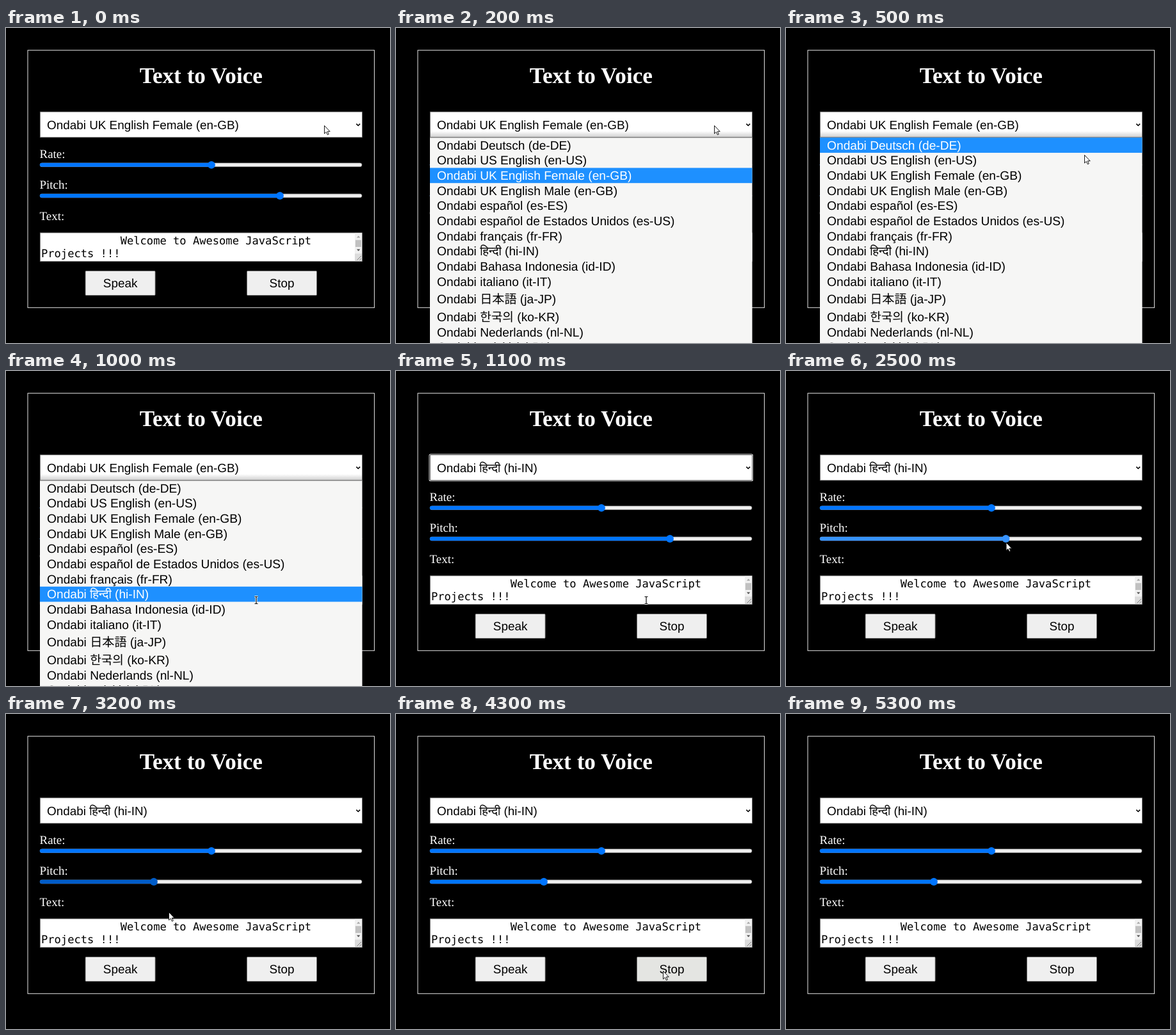
An HTML page for the animation above (8000 ms loop, 600x492 px).

```html
<!DOCTYPE html>
<html lang="en">
<head>
<meta charset="utf-8">
<title>Text to Voice</title>
<style>
html, body { margin: 0; width: 100%; height: 100%; overflow: hidden; background: #000; }
svg { display: block; width: 600px; height: 492px; }
text { text-rendering: geometricPrecision; }
.serif { font: 18.9px "Liberation Serif", serif; fill: #fff; }
.title { font-size: 35.2px; font-weight: bold; text-anchor: middle; }
.sans { font: 18.87px "Liberation Sans", "Noto Sans", "Noto Sans CJK JP", sans-serif; }
.mono { font: 17.1px "DejaVu Sans Mono", monospace; }
.mid { text-anchor: middle; }
.box { fill: #fff; stroke: #767676; stroke-width: .8; }
.button { fill: #efefef; }
.button.hover { fill: #e4e5e2; }
.option text { font-size: 19.15px; }
.option rect { fill: none; }
.option.active rect { fill: #1e90ff; }
.option.active text { fill: #fff; }
.slider .track { fill: #efefef; stroke: #b2b2b2; stroke-width: .7; }
.slider { fill: #0075ff; }
.slider.hover { fill: #005cc8; }
.slider.drag { fill: #3793ff; }
</style>
</head>
<body>
<svg viewBox="0 0 600 492">
  <defs>
    <linearGradient id="shade" x2="0" y2="1">
      <stop stop-opacity="0"/><stop offset="1" stop-opacity=".2"/>
    </linearGradient>
    <path id="beamShape" d="M-2.5-5.5H-1Q0-5.5 0-4.5V4.5Q0 5.5-1 5.5H-2.5M2.5-5.5H1Q0-5.5 0-4.5M0 4.5Q0 5.5 1 5.5H2.5"/>
  </defs>
  <rect width="600" height="492"/>
  <rect x="34" y="34.8" width="541.6" height="402" fill="none" stroke="#fff" stroke-width=".9"/>
  <text class="serif title" x="304.8" y="85.6">Text to Voice</text>

  <g id="ring">
    <rect x="51.5" y="129.5" width="506.5" height="42.8" rx="2.5" fill="#fff"/>
    <rect x="52.3" y="130.3" width="504.9" height="41.2" rx="2" fill="#101010"/>
  </g>
  <rect class="box" x="53.3" y="131" width="503.2" height="39.8"/>
  <text id="voice" class="sans" x="64.1" y="157.5"></text>
  <path d="M547.4 149.6l2.9 2.9 2.9-2.9" fill="none" stroke="#000" stroke-width="1.5"/>

  <text class="serif" x="52.6" y="203">Rate:</text>
  <text class="serif" x="52.6" y="251">Pitch:</text>
  <text class="serif" x="52.6" y="299.5">Text:</text>
  <g id="sliders"></g>

  <rect class="box" x="53.3" y="319.9" width="503.2" height="44.6"/>
  <text class="mono" x="178.7" y="337.8">Welcome to Awesome JavaScript</text>
  <text class="mono" x="55" y="358.3">Projects !!!</text>
  <path d="M545 320.3h11.1v32H545z" fill="#f1f1f1"/>
  <path d="M546 331.2h9v10.8h-9z" fill="#c1c1c1"/>
  <path d="M548 327.6l2.7-3 2.7 3z" fill="#a3a3a3"/>
  <path d="M548 345.6l2.7 3 2.7-3z" fill="#505050"/>
  <path d="M545 352.3h11.1v11.8H545z" fill="#dcdcdc"/>
  <path d="M548.5 362.5l6.5-6.5M552.5 362.5l2.5-2.5" stroke="#777" stroke-width=".9"/>

  <rect id="speakButton" class="box button" x="124.1" y="379.5" width="109" height="38" rx="1.2"/>
  <text class="sans mid" x="178.6" y="405">Speak</text>
  <rect id="stopButton" class="box button" x="376.5" y="379.5" width="109" height="38" rx="1.2"/>
  <text class="sans mid" x="431" y="405">Stop</text>

  <g id="popup">
    <rect x="53.6" y="161" width="502.8" height="10" fill="url(#shade)"/>
    <rect x="53" y="170.8" width="503.6" height="330" fill="#f6f6f5"/>
    <path d="M53 171.1h503.6" stroke="#666" stroke-width=".8"/>
    <g id="options"></g>
  </g>

  <g id="cursor">
    <path id="arrow" d="M.5.5V13L3.3 10.4 5.4 14.8 7.3 13.9 5.3 9.7H9.2z" fill="#fff" stroke="#000" stroke-width=".9" stroke-linejoin="round"/>
    <g id="beam" fill="none">
      <use href="#beamShape" stroke="#fff" stroke-width="3"/>
      <use href="#beamShape" stroke="#111" stroke-width="1.2"/>
    </g>
  </g>
</svg>
<script>
const LOOP = 8000, STEP = 100;
const $ = id => document.getElementById(id);
const show = (id, on) => $(id).setAttribute('visibility', on ? 'visible' : 'hidden');

const voices = [
  'Deutsch (de-DE)', 'US English (en-US)', 'UK English Female (en-GB)',
  'UK English Male (en-GB)', 'español (es-ES)', 'español de Estados Unidos (es-US)',
  'français (fr-FR)', 'हिन्दी (hi-IN)', 'Bahasa Indonesia (id-ID)', 'italiano (it-IT)',
  '日本語 (ja-JP)', '한국의 (ko-KR)', 'Nederlands (nl-NL)', 'polski (pl-PL)'
].map(label => 'Ondabi ' + label);

// Rows with East Asian glyphs are taller and sit lower.
let rowTop = 171.2;
$('options').innerHTML = voices.map(label => {
  const extra = /ja-JP|ko-KR/.test(label) ? 4 : 0;
  const row = `<g class="option"><rect x="53" y="${rowTop}" width="503.6" height="${23.7 + extra}"/>
    <text class="sans" x="64.1" y="${rowTop + 18.6 + extra * .9}">${label}</text></g>`;
  rowTop += 23.65 + extra;
  return row;
}).join('');
const options = [...$('options').children];

const slider = (id, y) => `<g id="${id}" class="slider">
  <rect class="track" x="53.2" y="${y - 2.8}" width="502.8" height="5.6" rx="2.8"/>
  <rect class="fill" x="52.8" y="${y - 3}" height="6" rx="3"/><circle cy="${y}" r="5.9"/></g>`;
$('sliders').innerHTML = slider('rate', 213.8) + slider('pitch', 262);

function setSlider(id, x, state) {
  const el = $(id);
  el.setAttribute('class', 'slider ' + state);
  el.querySelector('.fill').setAttribute('width', x - 52.8);
  el.querySelector('circle').setAttribute('cx', x);
}

// Pointer path: time, x, y
const path = [
  [0, 497, 152], [200, 497, 152], [300, 492, 158], [400, 492, 158], [500, 466, 198],
  [1000, 391, 358], [1200, 391, 358], [1600, 360, 262], [1800, 343, 214], [1900, 345, 250],
  [2100, 428, 258], [2200, 428, 264], [2900, 231, 272], [3100, 231, 272], [3200, 254, 309],
  [3300, 240, 345], [3500, 195, 402], [3700, 195, 402], [4300, 417, 401], [4800, 417, 401],
  [4900, 440, 372], [5000, 452, 348], [5100, 452, 348], [5200, 465, 335], [LOOP, 465, 335]
];

function pointer(t) {
  const i = path.findIndex(p => p[0] > t);
  const [t0, x0, y0] = path[i - 1], [t1, x1, y1] = path[i];
  const k = (t - t0) / (t1 - t0);
  return [x0 + (x1 - x0) * k, y0 + (y1 - y0) * k];
}

function draw(t) {
  const [x, y] = pointer(t);
  const within = (a, b) => t >= a && t < b;
  const opened = within(200, 1100), visible = t < 5300;
  const near = cy => !opened && visible && Math.abs(y - cy) < 7;

  show('popup', opened);
  show('ring', within(1100, 2200));
  $('voice').textContent = voices[t < 1100 ? 2 : 7];
  const active = t < 500 ? 2 : [0, 1, 3, 4, 5, 7][(t - 500) / STEP];
  options.forEach((el, i) => el.classList.toggle('active', i === active));

  const dragging = within(2200, 2900);
  const pitch = t < 2200 ? 428 : dragging ? x : 231;
  setSlider('rate', 321, near(214) ? 'hover' : '');
  setSlider('pitch', pitch, dragging ? 'drag' : within(2900, 3300) || near(262) ? 'hover' : '');

  const onButton = left => visible && y > 379 && y < 418 && x > left && x < left + 109;
  $('speakButton').classList.toggle('hover', onButton(124));
  $('stopButton').classList.toggle('hover', onButton(376.5));

  const overText = y > 320 && y < 365;
  $('cursor').setAttribute('transform', `translate(${x} ${y})`);
  show('arrow', visible && !overText);
  show('beam', visible && overText);
}

function tick() {
  draw(Math.floor(performance.now() % LOOP / STEP) * STEP);
  requestAnimationFrame(tick);
}
tick();
</script>
</body>
</html>
```
